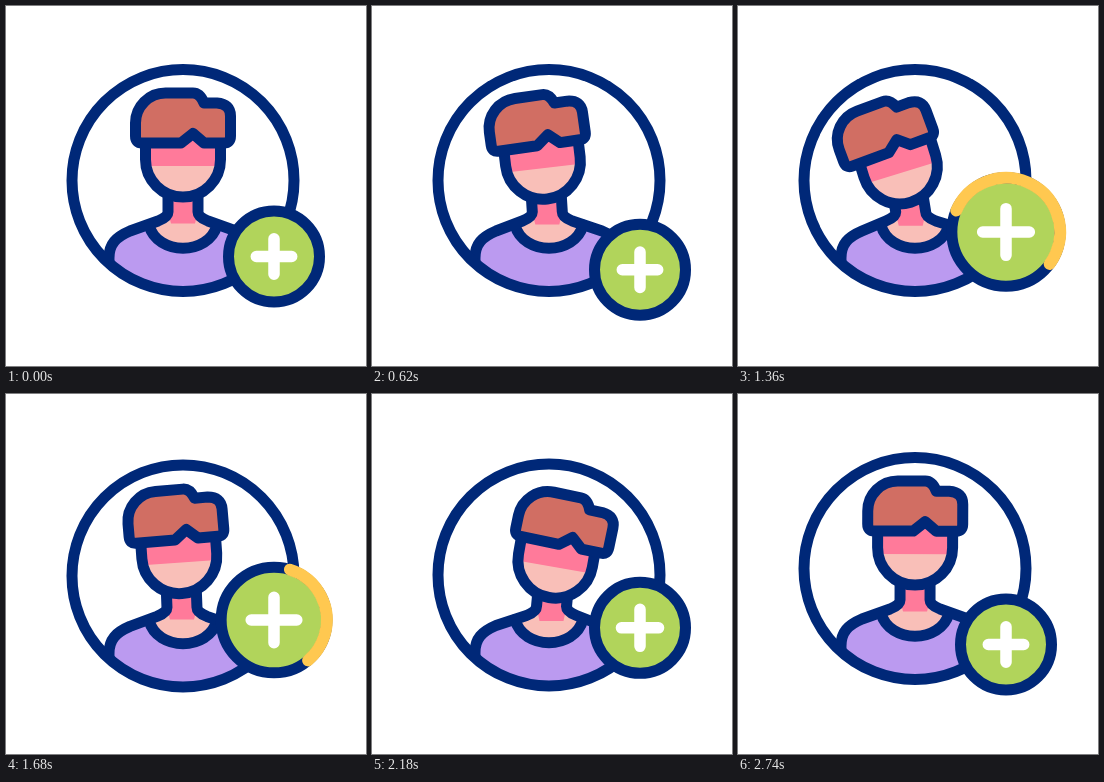
Animation, 360 px wide and 360 px high, one loop 3 s. Source, as an HTML page:

```html
<!DOCTYPE html>
<html lang="en">
<head>
<meta charset="utf-8">
<title>Add user</title>
<style>
  html, body { margin: 0; height: 100%; overflow: hidden; background: #fff; }
  svg { display: block; width: 100vw; height: 100vh; }
  .line { fill: none; stroke: #002878; stroke-width: 11; stroke-linecap: round; stroke-linejoin: round; }
  .skin { fill: #f9bfb8; }
  .shade { fill: #ff7a9a; }
</style>
</head>
<body>
<svg viewBox="0 0 360 360">
  <defs>
    <clipPath id="inside"><circle cx="177" cy="174.5" r="111"/></clipPath>
    <clipPath id="faceShape"><path d="M139.5 124V153.5A37.5 37.5 0 0 0 214.5 153.5V124Z"/></clipPath>
  </defs>

  <g id="avatar">
    <circle cx="177" cy="174.5" r="111" fill="#fff"/>
    <g clip-path="url(#inside)">
      <path id="torso" fill="#bb9af0"/>
      <path id="neck" class="skin"/>
      <path id="neckShade" class="shade"/>
      <path class="line" d="M143 219C151 250 203 250 211 219"/>
      <path id="shoulders" class="line"/>
    </g>
    <circle class="line" cx="177" cy="174.5" r="111"/>
    <g id="head">
      <g clip-path="url(#faceShape)">
        <rect class="skin" x="135" y="120" width="84" height="75"/>
        <rect class="shade" x="135" y="120" width="84" height="40"/>
      </g>
      <path class="line" d="M139.5 137V153.5A37.5 37.5 0 0 0 214.5 153.5V137"/>
      <path id="hair" class="line" style="fill:#d16e63" d="M136 137Q129.5 137 129.5 130V117A30 30 0 0 1 159.5 87H187Q194 87 198 97H211Q224.5 98 224.5 110V130Q224.5 137 218 137H198L187 127.5L175 137Z"/>
    </g>
  </g>

  <g id="badge">
    <circle id="disc" class="line" style="fill:#b1d45b"/>
    <circle id="arc" class="line" style="stroke:#ffc850;stroke-width:11.8" pathLength="360"/>
    <path id="plus" class="line" style="stroke:#fff;stroke-width:11.5"/>
  </g>
</svg>

<script>
const LOOP = 3000;
const el = id => document.getElementById(id);
const set = (id, attrs) => {
  for (const name in attrs) el(id).setAttribute(name, attrs[name]);
};
const smooth = u => u * u * (3 - 2 * u);
const linear = u => u;

// Value at time t along [time, value] keys.
function track(t, keys, ease = smooth) {
  if (t <= keys[0][0]) return keys[0][1];
  for (let i = 1; i < keys.length; i++) {
    const [t0, a] = keys[i - 1], [t1, b] = keys[i];
    if (t < t1) return a + (b - a) * ease((t - t0) / (t1 - t0));
  }
  return keys[keys.length - 1][1];
}

function drawAvatar(t) {
  const tilt = track(t, [[200, 0], [1180, -17.2], [1340, -17.2], [2040, 10], [2240, 10], [2780, 0]]);
  const dip = track(t, [[1400, 0], [1940, 14], [2400, 0]]);
  const shift = Math.min(0, -0.25 * tilt);
  const drop = Math.max(-0.27 * tilt, 0.58 * tilt);
  set('avatar', { transform: `translate(0 ${dip})` });
  set('head', { transform: `translate(${shift} ${drop}) rotate(${tilt} 177 205)` });
  // The hair swings a little further than the face.
  set('hair', { transform: `translate(${tilt * 0.33} 0) rotate(${tilt * 0.18} 177 115)` });

  // The neck bends with the head while the shoulders stay put.
  const top = tilt * 0.4, low = tilt * 0.25;
  const left = 162 + low, right = 192 + low;
  const shadeEnd = 217.5 + drop * 0.5;
  const leftSide = `103 260V252C103 238 110 231 124 225L${152 + low} 215Q${left} 211 ${left} 206L${162 + top} 190`;
  const rightSide = `${192 + top} 190L${right} 206Q${right} 211 ${202 + low} 215L230 225C244 231 251 238 251 252V260`;
  set('torso', { d: `M${leftSide}L${rightSide}V300H103Z` });
  set('shoulders', { d: `M${leftSide}M${rightSide}` });
  set('neck', { d: `M${162 + top} 190H${192 + top}L${right} 206L211 219C203 250 151 250 143 219L${left} 206Z` });
  set('neckShade', { d: `M${162 + top} 190H${192 + top}L${right} 206L${right - 3} ${shadeEnd}H${left + 3}L${left} 206Z` });
}

function drawBadge(t) {
  const y = track(t, [[200, 250.5], [600, 264], [1100, 226], [2000, 226], [2480, 250.5]]);
  const r = track(t, [[980, 45.5], [1500, 56], [2000, 45.5]]);
  const arm = track(t, [[700, 17.7], [1400, 23.4], [1500, 23.4], [2400, 17.7]]);
  const lead = track(t, [[817, 50], [1433, 410]]);
  const tail = track(t, [[820, 50], [940, 68], [1360, 203], [1980, 366], [2140, 410]], linear);
  const span = lead - tail;
  set('badge', { transform: `translate(268 ${y})` });
  set('disc', { r });
  set('arc', {
    r,
    transform: `rotate(${tail})`,
    'stroke-dasharray': `${Math.max(span, 0)} 360`,
    visibility: span > 1 ? 'visible' : 'hidden'
  });
  set('plus', { d: `M${-arm} 0H${arm}M0 ${-arm}V${arm}` });
}

const start = performance.now();
function frame() {
  const t = (performance.now() - start) % LOOP;
  drawAvatar(t);
  drawBadge(t);
  requestAnimationFrame(frame);
}
frame();
</script>
</body>
</html>
```
